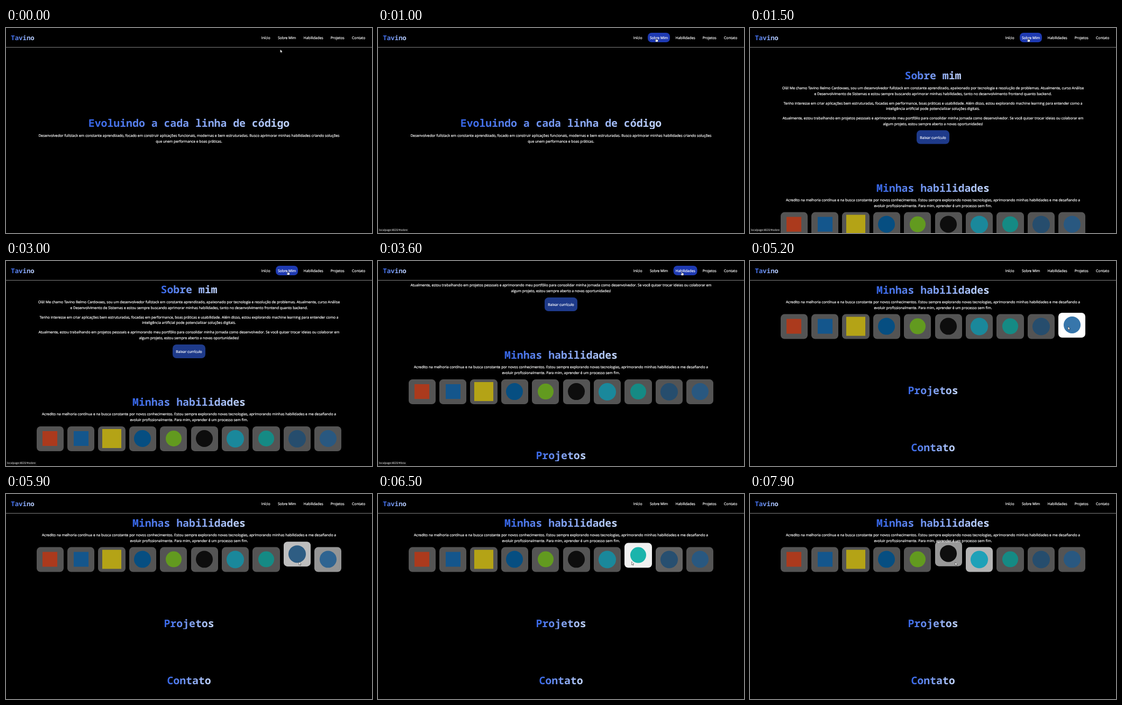
Animation of 692x388 px, one loop 8000 ms. Source, as an HTML page:

```html
<!DOCTYPE html>
<html lang="pt-BR">
<head>
<meta charset="utf-8">
<title>Portfólio</title>
<style>
  html, body { margin: 0; width: 100%; height: 100%; overflow: hidden; background: #000; }
  body {
    position: relative; color: #fff; white-space: nowrap;
    font: 6.76px/10.8px "Open Sans", "Noto Sans", sans-serif;
    text-rendering: geometricPrecision;
  }
  #stage { position: absolute; left: 0; top: 0; width: 692px; height: 388px; overflow: hidden; }
  #page { position: absolute; left: 0; top: 0; width: 692px; }
  section { box-sizing: border-box; padding-top: 43.2px; text-align: center; }
  #hero { height: 388px; padding-top: 169.2px; }
  #about { height: 212.4px; }
  #skills { height: 190.4px; }
  #projects, #contact { height: 108px; }

  h2, .logo {
    margin: 0; font-family: "Noto Sans Mono", "DejaVu Sans Mono", monospace; font-weight: 600;
    color: transparent; background: linear-gradient(90deg, #3565e8, #c3d6ff);
    -webkit-background-clip: text; background-clip: text;
  }
  h2 { width: max-content; height: 21.6px; margin: 0 auto; font-size: 19.82px; line-height: 21.6px; }
  p { margin: 7.2px 0 0; }
  p span, nav span, .button span { position: relative; top: .8px; -webkit-text-stroke: .2px #fff; }
  .button {
    width: 62.6px; height: 25.2px; margin: 7.2px auto 0; line-height: 25.2px;
    border-radius: 7.2px; background: #1e3a8a;
  }

  header {
    position: absolute; left: 0; top: 0; width: 692px; height: 36px;
    background: #000; border-bottom: 1px solid #808080;
  }
  .logo { position: absolute; left: 9.3px; top: 9.6px; font-size: 12.35px; line-height: 17px; }
  nav div {
    position: absolute; top: 8.8px; height: 18.2px; padding: 0 3.8px; line-height: 18.2px;
    border-radius: 7.2px; transform: translateX(-50%); font-size: 6.8px;
  }

  #cards { display: flex; gap: 7.2px; width: 576.6px; margin: 7.2px auto 0; }
  .card {
    flex: 1; height: 46.4px; border-radius: 7.2px;
    display: flex; align-items: center; justify-content: center;
  }
  #status {
    position: absolute; left: 0; bottom: 0; height: 9.5px; padding: 0 2px; line-height: 9.5px;
    font-size: 5.07px; background: #0a0a0a; border-top-right-radius: 2px;
  }
  #cursor { position: absolute; left: 0; top: 0; width: 10px; height: 12px; overflow: visible; }
  #cursor path { fill: #fff; stroke: #000; stroke-width: .45; stroke-linejoin: round; }
</style>
</head>
<body>
<div id="stage">
  <div id="page">
    <section id="hero">
      <h2>Evoluindo a cada linha de código</h2>
      <p><span>Desenvolvedor fullstack em constante aprendizado, focado em construir aplicações funcionais, modernas e bem estruturadas. Busco aprimorar minhas habilidades criando soluções<br>que unem performance e boas práticas.</span></p>
    </section>
    <section id="about">
      <h2>Sobre mim</h2>
      <p><span>Olá! Me chamo Tavino Belmo Cardovaes, sou um desenvolvedor fullstack em constante aprendizado, apaixonado por tecnologia e resolução de problemas. Atualmente, curso Análise<br>e Desenvolvimento de Sistemas e estou sempre buscando aprimorar minhas habilidades, tanto no desenvolvimento frontend quanto backend.</span></p>
      <p><span>Tenho interesse em criar aplicações bem estruturadas, focadas em performance, boas práticas e usabilidade. Além disso, estou explorando machine learning para entender como a<br>inteligência artificial pode potencializar soluções digitais.</span></p>
      <p><span>Atualmente, estou trabalhando em projetos pessoais e aprimorando meu portfólio para consolidar minha jornada como desenvolvedor. Se você quiser trocar ideias ou colaborar em<br>algum projeto, estou sempre aberto a novas oportunidades!</span></p>
      <div class="button"><span>Baixar currículo</span></div>
    </section>
    <section id="skills">
      <h2>Minhas habilidades</h2>
      <p><span>Acredito na melhoria contínua e na busca constante por novos conhecimentos. Estou sempre explorando novas tecnologias, aprimorando minhas habilidades e me desafiando a<br>evoluir profissionalmente. Para mim, aprender é um processo sem fim.</span></p>
      <div id="cards"></div>
    </section>
    <section id="projects"><h2>Projetos</h2></section>
    <section id="contact"><h2>Contato</h2></section>
  </div>
  <header>
    <div class="logo">Tavino</div>
    <nav></nav>
  </header>
  <div id="status"></div>
  <svg id="cursor">
    <path id="arrow" d="M0 0V6.2L1.5 4.9 2.5 7.1 3.5 6.7 2.5 4.5H4.4Z"/>
    <path id="hand" d="M-.6 .2Q0 -.5 .6 .2V2.7L3 3.2Q3.7 3.5 3.6 4.3L3.1 7.2H-.7L-2.4 4.6Q-2.3 3.7 -1.5 4.1L-.6 4.8Z"/>
  </svg>
</div>
<script>
const LOOP = 8000;
const $ = id => document.getElementById(id);
const clamp = v => Math.min(1, Math.max(0, v));

function bezier(x1, y1, x2, y2) {
  const at = (a, b, s) => 3 * (1 - s) * (1 - s) * s * a + 3 * (1 - s) * s * s * b + s * s * s;
  return x => {
    if (x <= 0) return 0;
    if (x >= 1) return 1;
    let lo = 0, hi = 1;
    for (let i = 0; i < 24; i++) {
      const mid = (lo + hi) / 2;
      if (at(x1, x2, mid) < x) lo = mid; else hi = mid;
    }
    return at(y1, y2, lo);
  };
}
const easeInOut = bezier(.42, 0, .58, 1);
const easeFade = bezier(.4, 0, .2, 1);
const easeFall = bezier(.8, 0, 1, 1);
const easeRise = bezier(0, 0, .2, 1);

// label, centre x, hover from, hover to
const links = [
  ['Início', 491.2], ['Sobre Mim', 531.1, 330, 3110], ['Habilidades', 581.2, 3140, 4600],
  ['Projetos', 626.8], ['Contato', 666.7]
];
// colour, size, round, hover from, hover to
const skills = [
  ['#e44d26', 28, 0], ['#1b73ba', 28, 0], ['#f0d91d', 36, 0], ['#0868ac', 32, 1], ['#83cd29', 30, 1],
  ['#111', 32, 1, 7745, 8500], ['#22b5cf', 33, 1, 7400, 7745], ['#1cb8b0', 30, 1, 6170, 7400],
  ['#336791', 33, 1, 5700, 6170], ['#3776ab', 32, 1, 4735, 5700]
];
// start, length, distance
const scrolls = [[1225, 350, 388], [3420, 400, 212.4]];
// time, x, y
const path = [
  [0, 518.5, 40.5], [90, 518.5, 40.5], [190, 567, 37], [330, 543, 26], [480, 530, 20], [680, 530, 20],
  [800, 526, 19], [2960, 526, 19], [3250, 574.5, 20], [4540, 574.5, 20], [4735, 599, 112],
  [4900, 602, 124], [5250, 601, 124], [5700, 582, 127], [6170, 516, 130], [6500, 479.5, 128],
  [7200, 475, 128], [7400, 459, 129], [7745, 401, 130], [7900, 388, 129], [8000, 386, 129]
];

function add(parent, html) {
  const el = document.createElement('div');
  el.innerHTML = html;
  return parent.appendChild(el);
}

const linkEls = links.map(([label, x]) => {
  const el = add(document.querySelector('nav'), `<span>${label}</span>`);
  el.style.left = x + 'px';
  return el;
});
const cardEls = skills.map(([color, size, round]) => {
  const el = add($('cards'), '<div></div>');
  el.className = 'card';
  el.firstChild.style.cssText =
    `width:${size}px;height:${size}px;background:${color};border-radius:${round ? '50%' : 0}`;
  return el;
});

function hover(t, from, to, length) {
  if (!(t >= from)) return 0;
  const up = easeFade((Math.min(t, to) - from) / length);
  return t < to ? up : up * (1 - easeFade((t - to) / length));
}

function bounce(t, from, to) {
  if (!(t >= from && t < to)) return 0;
  const p = (t - from) % 1000 / 500;
  return p < 1 ? 1 - easeFall(p) : easeRise(p - 1);
}

function cursorAt(t) {
  const i = Math.max(1, path.findIndex(p => p[0] > t));
  const [t0, x0, y0] = path[i - 1], [t1, x1, y1] = path[i];
  const p = clamp((t - t0) / (t1 - t0));
  return [x0 + (x1 - x0) * p, y0 + (y1 - y0) * p];
}

function render(t) {
  const y = scrolls.reduce((sum, [from, length, d]) => sum + d * easeInOut((t - from) / length), 0);
  $('page').style.transform = `translateY(${-y}px)`;

  links.forEach(([, , from, to], i) => {
    linkEls[i].style.background = `rgba(30,58,178,${hover(t, from, to, 150)})`;
  });
  skills.forEach(([, , , from, to], i) => {
    const lit = hover(t, from, to, 500), card = cardEls[i];
    card.style.background = `rgba(255,255,255,${.33 + .67 * lit})`;
    card.style.transform = `translateY(${-25 * bounce(t, from, to)}%)`;
    card.firstChild.style.filter = `brightness(${.75 + .25 * lit})`;
  });

  $('status').style.display = t > 400 && t < 4750 ? '' : 'none';
  $('status').textContent = 'localpage:4820/#' + (t < 3180 ? 'sobre' : 'lista');

  const [cx, cy] = cursorAt(t), onLink = t >= 330 && t < 4600;
  $('cursor').style.transform = `translate(${cx}px,${cy}px)`;
  $('arrow').style.display = onLink ? 'none' : '';
  $('hand').style.display = onLink ? '' : 'none';
}

const start = performance.now();
function tick() {
  render((performance.now() - start) % LOOP);
  requestAnimationFrame(tick);
}
tick();
</script>
</body>
</html>
```
